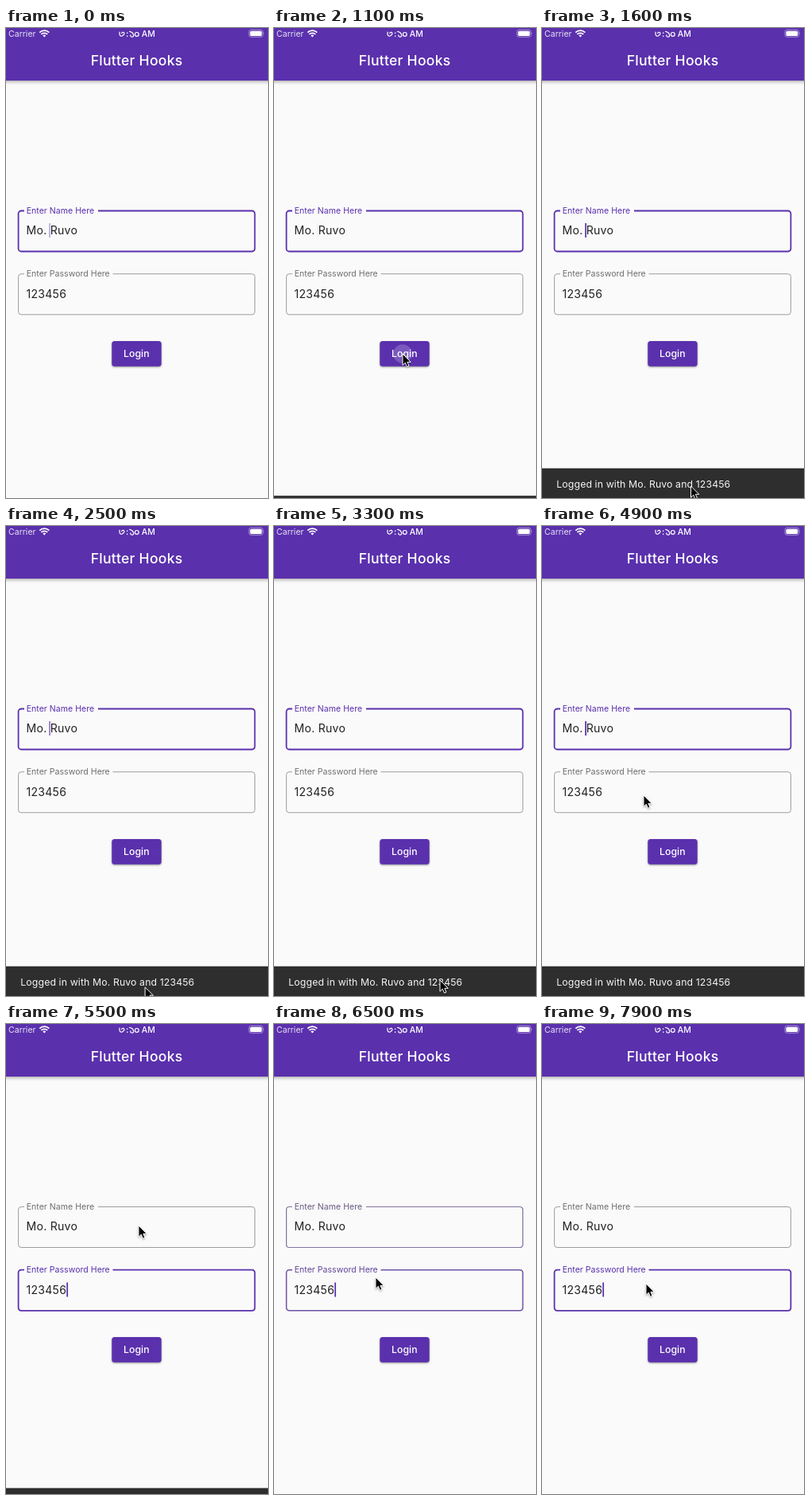
Animation, 330 px wide and 590 px high, one loop 8 s. Source, as an HTML page:

```html
<!DOCTYPE html>
<html lang="en">
<head>
<meta charset="utf-8">
<title>Login form</title>
<style>
  html, body { margin: 0; width: 100%; height: 100%; overflow: hidden; background: #fafafa; }
  svg { display: block; width: 330px; height: 590px; font: 14.08px Inter, Roboto, sans-serif; }
  .title { font-size: 17.6px; font-weight: 500; letter-spacing: .24px; fill: #fff; }
  .label { font-size: 10.56px; letter-spacing: .02px; }
  .input { fill: #212121; letter-spacing: .25px; }
  .status { font-size: 10.56px; fill: #fff; }
  .message { font-size: 12.32px; letter-spacing: .1px; fill: #f4f4f4; }
  .bar { filter: drop-shadow(0 1.5px 2.5px rgba(0, 0, 0, .4)); }
  .button { filter: drop-shadow(0 1.3px 1.3px rgba(0, 0, 0, .4)); }
  #pointer { filter: drop-shadow(0 1px 1px rgba(0, 0, 0, .35)); }
</style>
</head>
<body>
<svg viewBox="0 0 330 590">
  <rect width="330" height="590" fill="#fafafa"/>
  <rect class="bar" x="-10" y="-10" width="350" height="76" fill="#5a30ad"/>

  <text class="status" x="3" y="11" fill-opacity=".85">Carrier</text>
  <g fill="none" stroke="#fff" stroke-width="1.8">
    <path d="M42.3 5.6a8.6 8.6 0 0 1 12 0M44.4 7.9a5.6 5.6 0 0 1 7.8 0"/>
    <path d="M46.4 9.4a2.8 2.8 0 0 1 3.8 0L48.3 11.4z" fill="#fff" stroke="none"/>
  </g>
  <g fill="none" stroke="#fff" stroke-width="1.2" stroke-linecap="round">
    <path d="M143 5.2v2.8a2.4 2.4 0 0 0 4.6.8a1.7 1.7 0 1 0-1.9-2.2"/>
    <path d="M155.6 4.3q4.2 1 4.8 3.8a2 2 0 1 1-3.6.7"/>
    <circle cx="164.8" cy="7.9" r="2.4"/>
  </g>
  <text class="status" x="151" y="11" font-weight="600">:</text>
  <text class="status" x="170.8" y="11" font-weight="500">AM</text>
  <rect x="306" y="2.3" width="17.6" height="9" rx="2.6" fill="none" stroke="#fff" stroke-opacity=".5" stroke-width=".9"/>
  <rect x="307.4" y="3.7" width="14.8" height="6.2" rx="1.5" fill="#fff"/>
  <path d="M324.6 5.3q1.3 1.5 0 3z" fill="#fff" fill-opacity=".6"/>

  <text class="title" x="164.6" y="47" text-anchor="middle">Flutter Hooks</text>

  <g id="name">
    <path fill="none" d="M116 229.5H309.9a3.5 3.5 0 0 1 3.5 3.5V277a3.5 3.5 0 0 1-3.5 3.5H19.1a3.5 3.5 0 0 1-3.5-3.5V233a3.5 3.5 0 0 1 3.5-3.5H23"/>
    <text class="label" x="25.7" y="233.2">Enter Name Here</text>
    <text class="input" x="25.5" y="259.2">Mo. Ruvo</text>
    <rect class="caret" y="245" width="1.76" height="18" fill="#5a30ad"/>
  </g>
  <g id="pass">
    <path fill="none" d="M134.5 308.7H309.9a3.5 3.5 0 0 1 3.5 3.5V356.3a3.5 3.5 0 0 1-3.5 3.5H19.1a3.5 3.5 0 0 1-3.5-3.5V312.2a3.5 3.5 0 0 1 3.5-3.5H23"/>
    <text class="label" x="25.7" y="312.4">Enter Password Here</text>
    <text class="input" x="25.5" y="338.8">123456</text>
    <rect class="caret" x="76.3" y="324.5" width="1.76" height="18" fill="#5a30ad"/>
  </g>

  <rect class="button" x="133.3" y="393" width="62.4" height="31.7" rx="3.5" fill="#5a30ad"/>
  <clipPath id="clip"><rect x="133.3" y="393" width="62.4" height="31.7" rx="3.5"/></clipPath>
  <circle id="ripple" cx="162" cy="409" fill="#fff" clip-path="url(#clip)"/>
  <text x="164.3" y="412.9" text-anchor="middle" font-size="12.32" font-weight="500" fill="#fff">Login</text>

  <g id="snack">
    <rect y="552.7" width="330" height="38" fill="#2e2e2e"/>
    <text class="message" x="18.3" y="577.2">Logged in with Mo. Ruvo and 123456</text>
  </g>
  <path id="pointer" d="M0 0V14.3L3.3 11.2 5.5 16.3 8 15.2 5.9 10.3H10.3z" fill="#000" stroke="#fff" stroke-width="1" stroke-linejoin="round"/>
</svg>
<script>
const LOOP = 8000;
const LOGIN = 1053, TO_PASS = 5050, TO_NAME = 5680, BACK_TO_PASS = 6430;
const SNACK_IN = 1060, SNACK_OUT = 5310;
const PURPLE = [90, 48, 173];

// time, x, y of the pointer tip
const track = [
  [500, 300, 560], [900, 162, 409], [1100, 162, 409], [1550, 187.5, 575], [1700, 187.5, 575],
  [1850, 176, 578], [2700, 175, 579], [3200, 209, 570], [3400, 209, 570], [3620, 200, 490],
  [4400, 128, 338], [5080, 128, 338], [5450, 167, 253], [5750, 167, 253],
  [6350, 128, 318], [7450, 128, 318], [7800, 131, 326], [8000, 131, 326]
];

const $ = s => document.querySelector(s);
const clamp = v => Math.min(1, Math.max(0, v));
const mix = (a, b, k) => a + (b - a) * k;
const ramp = (t, start, length) => clamp((t - start) / length);
const easeOut = p => 1 - (1 - p) ** 2;
const smooth = p => p * p * (3 - 2 * p);
const set = (el, attrs) => { for (const k in attrs) el.setAttribute(k, attrs[k]); };

// cubic-bezier(.4, 0, .2, 1)
function standard(x) {
  let lo = 0, hi = 1;
  for (let i = 0; i < 20; i++) {
    const u = (lo + hi) / 2;
    if (1.2 * u * (1 - u) ** 2 + .6 * u * u * (1 - u) + u ** 3 < x) lo = u; else hi = u;
  }
  return smooth(lo);
}

// Lit for 500 ms, dark for 500 ms, with soft edges
function blink(t) {
  const p = t % 1000;
  if (p >= 500) return 1 - easeOut(ramp(p, 500, 250));
  return t < 500 ? 1 : easeOut(ramp(p, 0, 250));
}

function drawField(el, focus, caret) {
  const shade = grey => `rgb(${PURPLE.map(c => Math.round(mix(grey, c, focus)))})`;
  set(el.querySelector("path"), { stroke: shade(152), "stroke-width": mix(.95, 1.8, focus) });
  set(el.querySelector(".label"), { fill: shade(110) });
  set(el.querySelector(".caret"), { opacity: caret });
}

function drawPointer(t) {
  const i = track.findIndex(k => k[0] > t);
  set($("#pointer"), { visibility: i > 0 ? "visible" : "hidden" });
  if (i < 1) return;
  const [t0, x0, y0] = track[i - 1], [t1, x1, y1] = track[i];
  const k = smooth((t - t0) / (t1 - t0));
  set($("#pointer"), { transform: `translate(${mix(x0, x1, k)} ${mix(y0, y1, k)})` });
}

function draw(t) {
  const shift = start => standard(ramp(t, start, 167));
  const pass = shift(TO_PASS) - shift(TO_NAME) + shift(BACK_TO_PASS);
  const onName = t < TO_PASS || (t >= TO_NAME && t < BACK_TO_PASS);
  // The name field was focused long before the loop begins
  const focusedAt = [BACK_TO_PASS, TO_NAME, TO_PASS].find(tap => t >= tap) ?? -9595;
  const caret = blink(t - focusedAt);
  drawField($("#name"), 1 - pass, onName ? caret : 0);
  drawField($("#pass"), pass, onName ? 0 : caret);
  const nameEnd = 26 + $("#name .input").getComputedTextLength();
  set($("#name .caret"), { x: t < TO_PASS ? 54.2 : nameEnd });

  const press = ramp(t, LOGIN, 300);
  set($("#ripple"), { r: 40 * easeOut(press), opacity: press > 0 ? .24 * (1 - press) : 0 });

  const up = ramp(t, SNACK_IN, 250);
  const open = standard(Math.min(up, 1 - ramp(t, SNACK_OUT, 250)));
  set($("#snack"), { transform: `translate(0 ${37.5 * (1 - open)})` });
  set($(".message"), { opacity: ramp(up, .4, .6) });

  drawPointer(t);
}

const began = performance.now();
function tick() {
  draw((performance.now() - began) % LOOP);
  requestAnimationFrame(tick);
}
tick();
</script>
</body>
</html>
```
